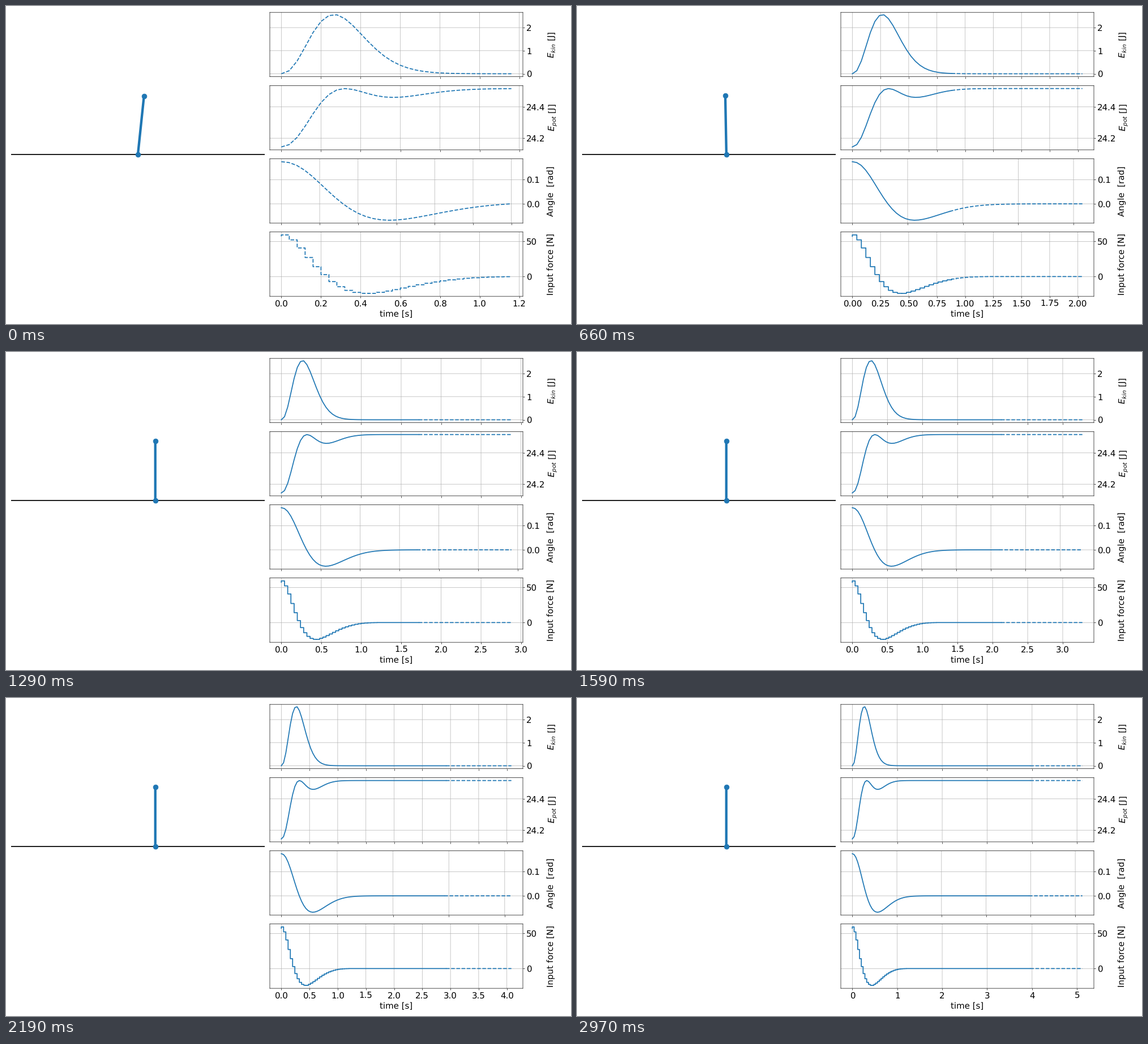
A matplotlib script for the animation above (3000 ms loop, 998 by 561 pixels).

```python
import matplotlib.pyplot as plt
import numpy as np
from matplotlib.animation import FuncAnimation

W, H, DPI = 998, 561, 62.375
FRAMES, INTERVAL = 100, 30
DT, HORIZON = 0.04, 30
BLUE = "tab:blue"

plt.rcParams.update({
    "font.family": "DejaVu Sans",
    "text.hinting": "none",
    "path.snap": False,
    "axes.grid": True,
    "lines.linewidth": 2.0,
    "axes.labelsize": "xx-large",
    "xtick.labelsize": "xx-large",
    "ytick.labelsize": "xx-large",
})

# Cart and pole: total mass, first and second moment of the pole, gravity
MASS, ML, INERTIA, G = 21.3, 2.5, 2.5 / 3, 9.80665
LENGTH, TILT = 0.5, np.radians(10)

# Control force on the cart, one value per time step, with no net impulse
PUSH = [57.4, 59.4, 52.3, 40.8, 27.2, 14.1, 2.8, -7.2, -14.5, -19.7, -22.6,
        -23.9, -24, -22.5, -20.7, -18.6, -16.3, -14, -11.7, -9.6, -7.7,
        -6.1, -4.7, -3.5, -2.5, -1.7, -1.1, -0.7, -0.4, -0.2, -0.1]


def solve(force):
    """Bounded response of the linearised pendulum to a stepwise force."""
    n = len(force)
    inertia = INERTIA - ML**2 / MASS
    rate = np.sqrt(ML * G / inertia)
    decay = np.exp(-rate * DT)
    gain = ML / MASS / inertia * (1 - decay) / rate

    grow, fade = np.zeros(n), np.zeros(n)
    for i in range(n - 2, -1, -1):
        grow[i] = decay * grow[i + 1] + gain * force[i]
    fade[0] = grow[0] - 2 * rate * TILT
    for i in range(n - 1):
        fade[i + 1] = decay * fade[i] - gain * force[i]
    theta = (grow - fade) / (2 * rate)
    omega = (grow + fade) / 2
    omega[0] = 0

    impulse = np.concatenate([[0], np.cumsum(force[:-1]) * DT])
    steps = (impulse[1:] + impulse[:-1]) / 2 * DT
    drift = np.concatenate([[0], np.cumsum(steps)])
    cart = (drift + ML * (np.sin(TILT) - np.sin(theta))) / MASS
    e_kin = impulse**2 / (2 * MASS) + inertia * omega**2 / 2
    e_pot = ML * G * np.cos(theta)
    return cart, theta, e_kin, e_pot


count = FRAMES + HORIZON + 1
time = np.arange(count) * DT
force = np.zeros(count)
force[:len(PUSH)] = PUSH
cart, theta, e_kin, e_pot = solve(force)

fig = plt.figure(figsize=(W / DPI, H / DPI), dpi=DPI, facecolor="white")


def add_axes(left, top, width, height):
    return fig.add_axes([left / W, 1 - (top + height) / H, width / W, height / H])


# Pendulum view
stage = add_axes(9.4, 11.3, 447.1, 501.2)
stage.axhline(0, color="black")
bar, = stage.plot([], [], "-o", color=BLUE, linewidth=5, markersize=10)
stage.set(xlim=(-1.8, 1.8), ylim=(-1.2, 1.2))
stage.set_axis_off()


class Plot:
    """A panel with the past as a solid and the forecast as a dashed line."""

    def __init__(self, row, label, data, low, high, ahead=HORIZON, style="default"):
        self.data, self.ahead = data, ahead
        self.ax = ax = add_axes(466, 11.2 + 129.15 * row, 447, 113.5)
        self.past, = ax.plot([], [], color=BLUE, drawstyle=style)
        self.next, = ax.plot([], [], "--", color=BLUE, drawstyle=style)
        pad = 0.05 * (high - low)
        ax.set_ylim(low - pad, high + pad)
        ax.yaxis.tick_right()
        ax.yaxis.set_label_position("right")
        ax.set_ylabel(label)
        ax.yaxis.set_label_coords(1.096, 0.5)
        ax.tick_params(labelbottom=row == 3)

    def forecast(self, k):
        return self.data[k:k + self.ahead]

    def show(self, k):
        end = k + self.ahead
        self.past.set_data(time[:k + 1], self.data[:k + 1])
        self.next.set_data(time[k:end], self.forecast(k))
        span = time[end - 1]
        self.ax.set_xlim(-0.05 * span, 1.05 * span)


class AnglePlot(Plot):
    def forecast(self, k):
        # The plan always brings the pole upright at the end of the horizon
        return super().forecast(k) * (1 - np.linspace(0, 1, self.ahead)**10)


plots = [
    Plot(0, "$E_{kin}$ [J]", e_kin, 0, 2.534),
    Plot(1, "$E_{pot}$ [J]", e_pot, 24.144, 24.517),
    AnglePlot(2, "Angle  [rad]", theta, -0.0677, TILT, HORIZON + 1),
    Plot(3, "Input force [N]", force, -24, 59.4, style="steps"),
]
plots[-1].ax.set_xlabel("time [s]")


def update(k):
    x, a = cart[k], theta[k]
    bar.set_data([x, x + LENGTH * np.sin(a)], [0, LENGTH * np.cos(a)])
    for plot in plots:
        plot.show(k)


anim = FuncAnimation(fig, update, frames=FRAMES, interval=INTERVAL,
                     repeat=True, repeat_delay=0)
plt.show()
```
